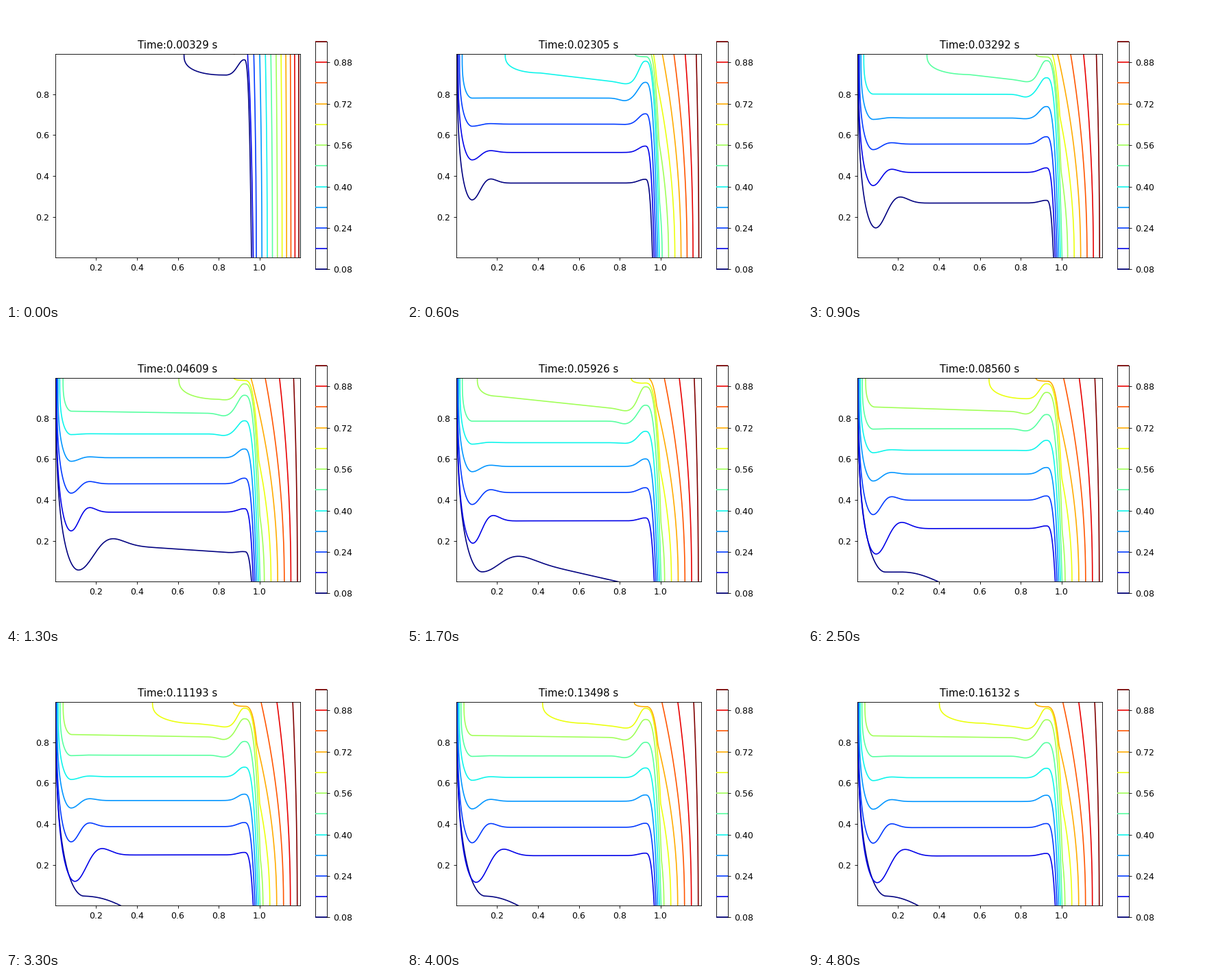
A matplotlib script that plays this animation: 576x432 px, repeating every 4900 ms.

```python
import numpy as np
import matplotlib.pyplot as plt
from matplotlib.animation import FuncAnimation

W, H, DPI = 576, 432, 90
FRAMES, STEP_MS, DT = 49, 100, 0.0032922
LEFT, RIGHT, TOP, BASE = 72, 429.12, 69.5, 366.82   # plot box in pixels
SCALE = (RIGHT - LEFT) / 1.195                      # pixels per data unit
LO = 0.0025                                         # first cell centre
PEAK_X, WALL_X = 347, 371

plt.rcParams.update({"axes.linewidth": 0.7, "xtick.major.width": 0.7,
                     "ytick.major.width": 0.7})

levels = np.arange(1, 13) * 0.08
colors = plt.get_cmap("jet")(np.linspace(0, 1, 12))


def soft(x, width):
    """Smooth max(x, 0)."""
    return width * np.logaddexp(0, x / width)


def near(x, centre, width):
    return np.exp(-((x - centre) / width) ** 2)


def core_height(i, n):
    """Height of isoline i in the core, sinking while the cavity fills."""
    k = i - 2
    steady = 72 + 43 * k - 1.65 * k * k
    return BASE - steady - 191 * np.exp(-n / 6.9) - 57 * np.exp(-n / 1.5)


def core(x, z):
    """Stratified part, from the dip at the cold wall to the warm bump."""
    low = max(z - 295, 0)
    base = z + low ** 2 / 100
    drain = 0.055 * low ** 2 * soft(x - 150, 12) / 190

    stretch = 1 + max(z - 275, 0) / 40
    t = (x - 95 - 0.3 * max(z - 275, 0)) / stretch
    bottom = base + 40 * (max(z - 125, 0) / 170) ** 2
    dip = bottom - soft(bottom - 353, 8) - base
    wave = dip * near(t, 0, 26) * np.cos(np.pi * t / 36)

    tilt = 10 * near(z, 100, 14) * (x - 210) / 85
    sag = 4 * near(z, 130, 30) * near(x, 318, 12)

    ceiling = 77 + 0.45 * min(z - 75, 0)
    rise = 28 * np.exp(-(z - 120) / 85)
    crest = ceiling + soft(z - rise - ceiling, 12)
    bump = near(x, PEAK_X, 13)
    return (base + drain + wave + (tilt + sag) * (1 - bump)
            - (z - crest) * bump)


def wall(i, n, y):
    """Isoline inside the conducting wall, close to linear conduction."""
    s = 12.5 - i
    foot = 10 - 4.7 * np.exp(-n / 6)
    head = 23.3 - 17.7 * np.exp(-n / 7)
    bend = 1 + 0.03 * s * np.exp(-n / 6)
    up = (BASE - y) / (BASE - TOP)
    return 429.7 - s * bend * (foot + (head - foot) * up ** 2)


def isoline(i, n):
    z = core_height(i, n)

    # cold side: along the left wall, or a nose hanging from the top
    nose = 250 / (1 + np.exp((z - 95) / 4))
    x0 = 72.7 + 10 * np.exp(-max(z - 120, 0) / 55) + nose
    x1 = 95 + 0.3 * max(z - 275, 0) + nose + nose * (250 - nose) / 300
    a = np.linspace(0, np.pi / 2, 40)
    cold_x = x0 + (x1 - x0) * (1 - np.cos(a))
    cold_y = TOP + (core(x1, z) - TOP) * np.sin(a) ** (2 / 3)

    mid_x = np.linspace(x1, PEAK_X, 140)
    mid_y = core(mid_x, z)

    # warm side: boundary layer first, then the solid wall
    v = np.linspace(0, 1, 80) ** 3
    warm_y = mid_y[-1] + v * max(BASE - mid_y[-1], 5)
    layer = PEAK_X + (355.5 + 2.5 * i - PEAK_X) * v ** 0.3
    warm_x = np.maximum(np.minimum(layer, WALL_X), wall(i, n, warm_y))

    return (np.concatenate([cold_x, mid_x, warm_x]),
            np.concatenate([cold_y, mid_y, warm_y]))


fig = plt.figure(figsize=(W / DPI, H / DPI), dpi=DPI)
ax = fig.add_axes([LEFT / W, 1 - BASE / H, (RIGHT - LEFT) / W,
                   (BASE - TOP) / H])
ax.set_xlim(LO, 1.2 - LO)
ax.set_ylim(LO, 1 - LO)
ax.set_xticks(np.arange(1, 6) * 0.2)
ax.set_yticks(np.arange(1, 5) * 0.2)
title = ax.set_title("")
lines = [ax.plot([], [], color=c, lw=1.3)[0] for c in colors]

bar = fig.add_axes([0.78375, 0.11, 0.77 * H / 20 / W, 0.77])
bar.hlines(levels, 0, 1, colors=colors, lw=1.3, zorder=3, clip_on=False)
bar.set_xlim(0, 1)
bar.set_ylim(levels[0], levels[-1])
bar.set_xticks([])
bar.yaxis.tick_right()
bar.set_yticks(levels[::2], [f"{v:.2f}" for v in levels[::2]])


def draw(n):
    for i, line in enumerate(lines, 1):
        x, y = isoline(i, n)
        line.set_data((x - LEFT) / SCALE + LO, (BASE - y) / SCALE + LO)
    title.set_text(f"Time:{DT * (n + 1):.5f} s")
    return [*lines, title]


anim = FuncAnimation(fig, draw, frames=FRAMES, interval=STEP_MS, repeat=True,
                     repeat_delay=0, blit=False)
plt.show()
```
